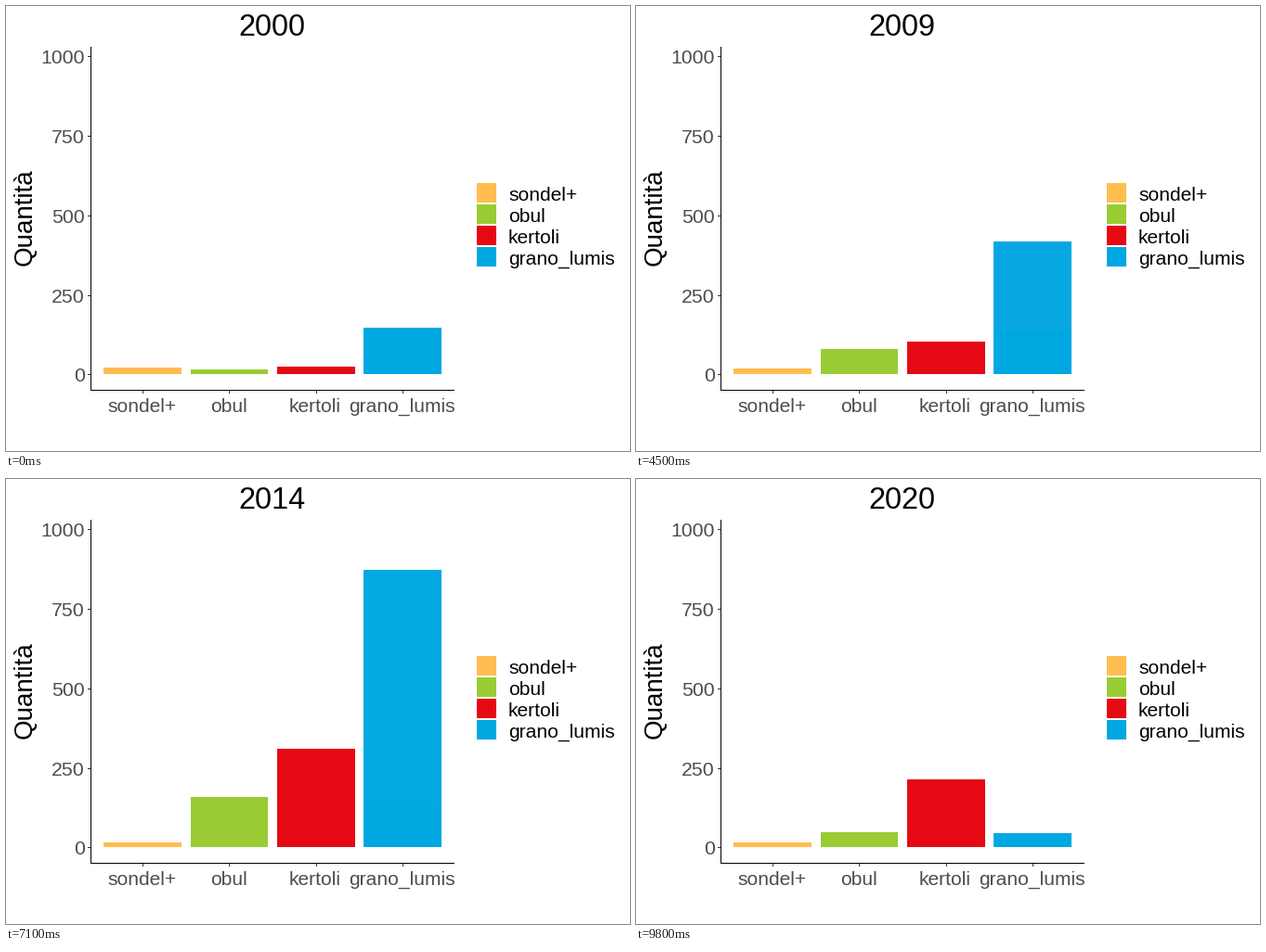
Animation of 672 by 480 pixels, one loop 10000 ms. Source, as a matplotlib script:

```python
import matplotlib.pyplot as plt
import numpy as np
from matplotlib.animation import FuncAnimation
from matplotlib.colors import to_rgb
from matplotlib.patches import Rectangle

W, H, DPI = 672, 480, 96
FRAMES, STEP_MS = 100, 100
BASE, FIRST_YEAR, LAST_YEAR = 397, 2000, 2020
GRAY = "#4D4D4D"

# Each bar: name, colour, and its counts in the key years.
KEY_YEARS = [2000, 2003, 2006, 2011, 2014, 2016, 2018, 2020]
SERIES = [
    ("sondel+", "#FFBD4F", [22, 28, 22, 19, 16, 28, 25, 16]),
    ("obul", "#99CC33", [16, 22, 54, 118, 159, 215, 290, 48]),
    ("kertoli", "#E50914", [25, 42, 63, 168, 311, 590, 833, 214]),
    ("grano_lumis", "#00A8E1", [148, 174, 296, 594, 874, 981, 695, 45]),
]


def counts(year):
    """Constant-rate growth between key years; half years are in-between poses."""
    return [np.exp(np.interp(year, KEY_YEARS, np.log(c))) for _, _, c in SERIES]


def move_frame(k):
    """Frame of the in-between pose before year k; the last years are shorter."""
    return 5 * k - max(0, k - 17)


MOVES = [move_frame(k) for k in range(1, LAST_YEAR - FIRST_YEAR + 1)]


def row(value):
    return round(397.6 - 0.343 * value)


def box(x0, y0, x1, y1, color):
    patch = Rectangle((x0, y0), x1 - x0, y1 - y0, facecolor=color,
                      edgecolor="none", linewidth=0, antialiased=False)
    return ax.add_patch(patch)


def label(x, y, text, px, color="black", ha="center", **kw):
    return ax.text(x, y, text, fontsize=px * 72 / DPI, color=color, ha=ha,
                   va="baseline", family="Liberation Sans", **kw)


def set_rows(patch, top, bottom):
    patch.set_y(top)
    patch.set_height(max(bottom - top, 0))


class Tint:
    """Upper part of a bar in another shade that fades with the years."""

    def __init__(self, index, start, floor, shade):
        self.index, self.start, self.floor = index, start, row(floor)
        self.plain = np.array(to_rgb(SERIES[index][1]))
        self.shade = np.array(to_rgb(shade))
        bar = bars[index]
        self.patch = box(bar.get_x(), BASE, bar.get_x() + bar.get_width(),
                         BASE, shade)

    def update(self, year, value):
        age = year - self.start
        mix = np.exp(-age / 4) if age >= 0 else 0
        self.patch.set_facecolor(self.plain + mix * (self.shade - self.plain))
        set_rows(self.patch, row(value), self.floor if age >= 0 else 0)


fig = plt.figure(figsize=(W / DPI, H / DPI), dpi=DPI, facecolor="white")
ax = fig.add_axes([0, 0, 1, 1])
ax.set_xlim(0, W)
ax.set_ylim(H, 0)
ax.axis("off")

# Axis lines and vertical scale
box(91, 44, 92, 415, "black")
box(91, 414, 483, 415, "black")
for value in range(0, 1001, 250):
    y = round(397.4 - 0.343 * value)
    box(88, y, 91, y + 1, "#333333")
    label(84.5, y + 8, str(value), 21.3, GRAY, "right")

# Bars, their labels and the legend
bars = []
for i, (name, color, _) in enumerate(SERIES):
    mid = 147.25 + 93.2 * i
    bars.append(box(round(mid - 41.9), BASE, round(mid + 41.9), BASE, color))
    box(round(mid), 415, round(mid) + 1, 418, "#333333")
    label(mid - 0.7, 438, name, 21, GRAY)
    y = 191 + 23 * i
    box(507, y, 528, y + 21, color)
    label(541, y + 19, name, 21, ha="left")

tints = [Tint(1, 2018, 245, "#B5C63F"), Tint(3, 2003, 138, "#1EA8E1")]
label(28, 228, "Quantità", 27.8, rotation=90, rotation_mode="anchor")
title = label(286.5, 32, "", 32.5)


def update(frame):
    year = FIRST_YEAR + sum(frame >= m for m in MOVES)
    title.set_text(str(year))
    values = counts(year - 0.5 if frame in MOVES else year)
    for bar, value in zip(bars, values):
        set_rows(bar, row(value), BASE)
    for tint in tints:
        tint.update(year, values[tint.index])
    return bars + [t.patch for t in tints] + [title]


anim = FuncAnimation(fig, update, frames=FRAMES, interval=STEP_MS,
                     init_func=lambda: update(0), repeat=True,
                     repeat_delay=0, blit=False)
plt.show()
```
